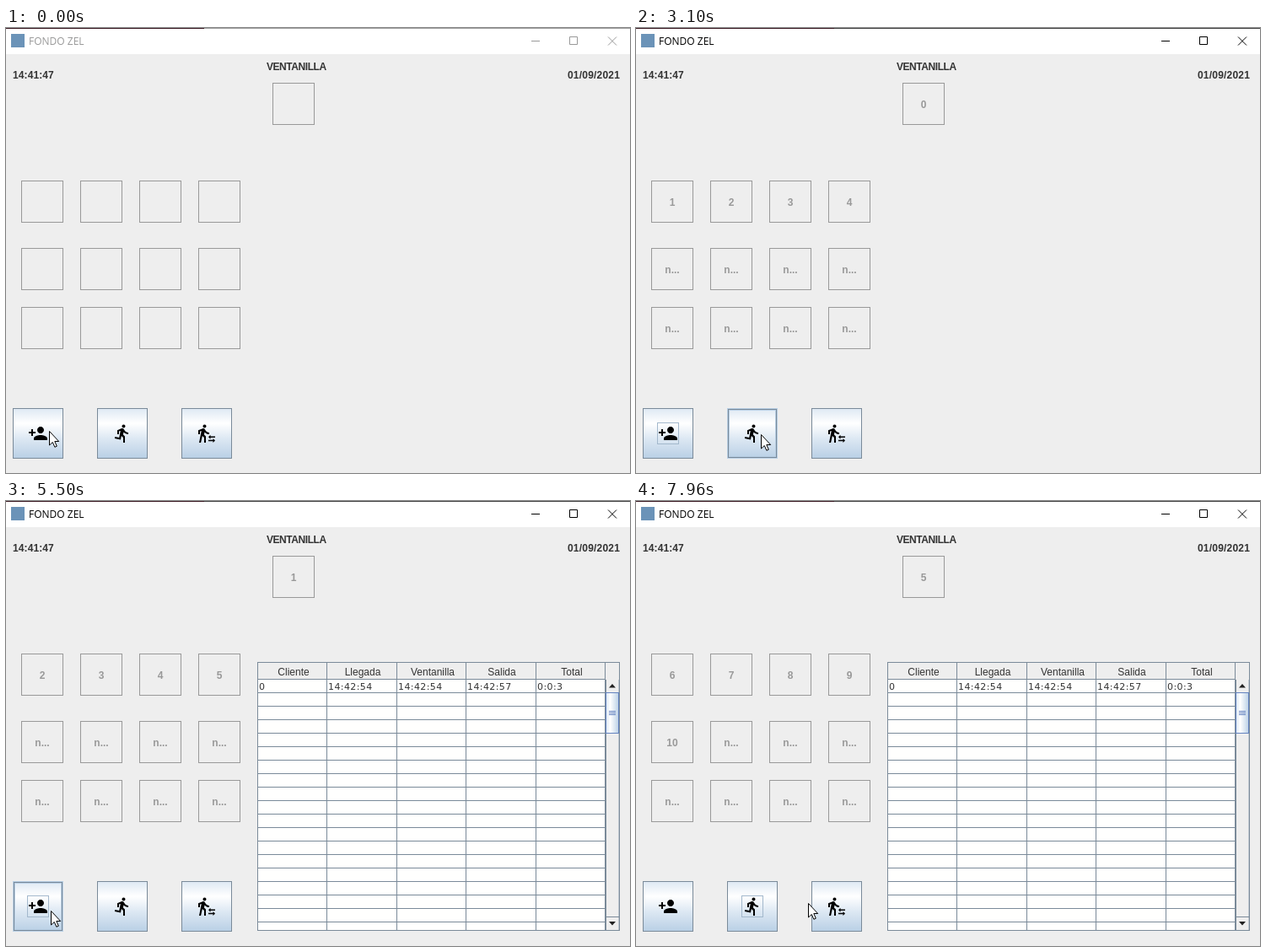
These frames come from a looping animation (740x528 px, 8 s). An HTML page:

```html
<!DOCTYPE html>
<html lang="es">
<head>
<meta charset="utf-8">
<title>Ventanilla</title>
<style>
  html, body { margin: 0; width: 100%; height: 100%; overflow: hidden; background: #eee; }
  svg { display: block; width: 740px; height: 528px; }
  text { font-family: "Liberation Sans", Arial, sans-serif; font-size: 12px; fill: #333; white-space: pre; }
  .bold { font-weight: bold; }
  .mid { text-anchor: middle; }
  .off { fill: #999; }
  .title { font-family: "Open Sans", sans-serif; }
  .row { font-family: "DejaVu Sans", sans-serif; font-size: 11px; letter-spacing: .4px; }
</style>
</head>
<body>
<svg id="stage" viewBox="0 0 740 528">
  <defs>
    <linearGradient id="ocean" x2="0" y2="1">
      <stop offset="0" stop-color="#dde8f3"/>
      <stop offset=".3" stop-color="#fff"/>
      <stop offset=".6" stop-color="#dde8f3"/>
      <stop offset="1" stop-color="#b8cfe5"/>
    </linearGradient>
    <linearGradient id="thumb">
      <stop offset="0" stop-color="#dde8f3"/>
      <stop offset=".3" stop-color="#fff"/>
      <stop offset="1" stop-color="#b8cfe5"/>
    </linearGradient>
  </defs>
</svg>
<script>
const LOOP = 8000;
const EDGE = '#7a8a99', SOFT = '#b8cfe5', FOCUS = '#a3b8cc';
const stage = document.getElementById('stage');

function add(parent, tag, attrs, text) {
  const el = document.createElementNS('http://www.w3.org/2000/svg', tag);
  for (const k in attrs) el.setAttribute(k, attrs[k]);
  if (text !== undefined) el.textContent = text;
  parent.append(el);
  return el;
}
const fill = (p, x, y, width, height, color) =>
  add(p, 'rect', { x, y, width, height, fill: color });
const frame = (p, x, y, w, h, color) =>
  add(p, 'rect', { x: x + .5, y: y + .5, width: w - 1, height: h - 1, fill: 'none', stroke: color });
const label = (p, x, y, cls, text) => add(p, 'text', { x, y, class: cls }, text);
const path = (p, d, attrs) => add(p, 'path', { d, ...attrs });
const group = p => add(p, 'g', {});
const show = (el, on) => el.setAttribute('visibility', on ? 'visible' : 'hidden');

// Window and title bar
fill(stage, 0, 0, 740, 528, '#eee');
fill(stage, 0, 0, 740, 31, '#fff');
const topLine = fill(stage, 0, 0, 740, 1, '#8c8c8c');
fill(stage, 0, 0, 235, 1, '#3a1822');
fill(stage, 6, 7, 16, 16, '#6b93b8');
const title = label(stage, 27, 20, 'title', 'FONDO ZEL');
const controls = path(stage, 'M623 15.5h10M668.5 10.5h9v9h-9zM714 10.5l10 10M724 10.5l-10 10', { fill: 'none' });

// Labels and boxes
label(stage, 8, 60, 'bold', '14:41:47').style.letterSpacing = '.1px';
label(stage, 309, 50, 'bold', 'VENTANILLA').style.letterSpacing = '-.45px';
label(stage, 666, 60, 'bold', '01/09/2021').style.letterSpacing = '.2px';

function box(x, y) {
  frame(stage, x, y, 50, 50, '#999');
  return label(stage, x + 25, y + 30, 'bold mid off', '');
}
const desk = box(316, 65);
const cells = [];
for (const y of [181, 261, 331])
  for (let i = 0; i < 4; i++) cells.push(box(18 + i * 70, y));

// Table
const table = group(stage);
const cols = [298, 380, 463, 545, 628, 710];
const heads = ['Cliente', 'Llegada', 'Ventanilla', 'Salida', 'Total'];
const values = ['0', '14:42:54', '14:42:54', '14:42:57', '0:0:3'];
fill(table, 298, 191, 430, 320, '#eee');
fill(table, 299, 212, 412, 298, '#fffffe');
fill(table, 299, 211, 412, 1, EDGE);
for (let y = 227; y < 508; y += 16) fill(table, 299, y, 412, 1, EDGE);
cols.forEach(x => fill(table, x, 192, 1, 318, EDGE));
heads.forEach((h, i) => {
  label(table, cols[i] + 43, 207, 'mid', h);
  label(table, cols[i] + 2, 224, 'row', values[i]);
});
frame(table, 298, 191, 430, 319, EDGE);
fill(table, 711, 212, 16, 297, '#eee');
fill(table, 711, 212, 1, 297, EDGE);
fill(table, 726, 212, 1, 297, '#c4ccd4');
fill(table, 712, 227, 15, 1, EDGE);
fill(table, 712, 493, 15, 1, EDGE);
path(table, 'M715 221.5h8l-4-4.5zM715 499h8l-4 4.5z', { fill: '#222' });
fill(table, 712, 228, 15, 48, 'url(#thumb)');
frame(table, 711, 227, 16, 49, '#6382bf');
for (const y of [249, 251, 253]) fill(table, 715, y, 8, 1, '#6382bf');

// Buttons
const icons = [
  'M15 12c2.21 0 4-1.79 4-4s-1.79-4-4-4-4 1.79-4 4 1.79 4 4 4zm-9-2V7H4v3H1v2h3v3h2v-3h3v-2H6zm9 4c-2.67 0-8 1.34-8 4v2h16v-2c0-2.66-5.33-4-8-4z',
  'M13.49 5.48c1.1 0 2-.9 2-2s-.9-2-2-2-2 .9-2 2 .9 2 2 2zm-3.6 13.9l1-4.4 2.1 2v6h2v-7.5l-2.1-2 .6-3c1.3 1.5 3.3 2.5 5.5 2.5v-2c-1.9 0-3.5-1-4.3-2.4l-1-1.6c-.4-.6-1-1-1.7-1-.3 0-.5.1-.8.1l-5.2 2.2v4.7h2v-3.4l1.8-.7-1.6 8.1-4.9-1-.4 2 7 1.4z',
  'M16.49 15.5v-1.75L14 16.25l2.49 2.5V17H22v-1.5zm3.02 4.25H14v1.5h5.51V23L22 20.5 19.51 18zM9.5 5.5c1.1 0 2-.9 2-2s-.9-2-2-2-2 .9-2 2 .9 2 2 2zM5.75 8.9L3 23h2.1l1.75-8L9 17v6h2v-7.55L8.95 13.4l.6-3C10.85 12 12.8 13 15 13v-2c-1.85 0-3.45-1-4.35-2.45l-.95-1.6C9.35 6.35 8.7 6 8 6c-.25 0-.5.05-.75.15L2 8.3V13h2V9.65z'
];
const buttons = icons.map((d, i) => {
  const g = add(stage, 'g', { transform: `translate(${8 + i * 100} 451)` });
  fill(g, 0, 0, 60, 60, 'url(#ocean)');
  frame(g, 0, 0, 60, 60, EDGE);
  const hover = group(g);
  frame(hover, 0, 0, 60, 60, SOFT);
  frame(hover, 2, 2, 56, 56, SOFT);
  frame(hover, 1, 1, 58, 58, EDGE);
  const down = group(g);
  fill(down, 0, 0, 60, 60, SOFT);
  frame(down, 0, 0, 60, 60, EDGE);
  fill(down, 1, 1, 58, 1, EDGE);
  fill(down, 1, 1, 1, 58, EDGE);
  const focus = frame(g, 17, 17, 26, 26, FOCUS);
  path(g, d, { transform: 'translate(18 18)' });
  return { hover, down, focus };
});

const cursor = path(stage, 'M0 0V16.5L3.8 13L6.4 18.8L8.8 17.7L6.3 12H11.2Z',
  { fill: '#fff', stroke: '#000', 'stroke-width': 1 });

// Clicks: press, release, button (0 add, 1 call next, 2 finish)
const clicks = [
  [760, 1100, 0], [1360, 1460, 0], [2060, 2100, 0], [2300, 2330, 0], [2560, 2630, 0],
  [3260, 3430, 1], [4430, 4530, 2],
  [5300, 5500, 0], [5660, 5730, 0], [5860, 5930, 0], [6060, 6130, 0], [6300, 6400, 0], [6500, 6560, 0],
  [7000, 7060, 1], [7260, 7300, 1], [7430, 7460, 1], [7560, 7630, 1]
];
// Pointer: time, x, y
const track = [
  [0, 51, 478], [2660, 51, 478], [2860, 163, 481], [3000, 163, 481], [3100, 148, 482],
  [3500, 148, 482], [3700, 204, 485], [4000, 204, 485], [4130, 227, 482], [4600, 227, 482],
  [5100, 53, 486], [6580, 53, 486], [6760, 157, 474], [7660, 157, 474], [7960, 204, 477], [LOOP, 204, 477]
];

function pointer(t) {
  const i = track.findIndex(k => k[0] > t);
  const [t0, x0, y0] = track[i - 1], [t1, x1, y1] = track[i];
  const k = (t - t0) / (t1 - t0);
  return [Math.round(x0 + (x1 - x0) * k), Math.round(y0 + (y1 - y0) * k)];
}

function render(t) {
  let last = -1, served = 0, held = -1, focused = -1, done = false;
  for (const [press, release, b] of clicks) {
    if (t < press) break;
    focused = b;
    if (t < release) { held = b; break; }
    if (b === 0) last++;
    if (b === 1) served++;
    if (b === 2) done = true;
  }
  const active = t >= 760, ink = active ? '#000' : '#999';
  title.style.fill = ink;
  controls.setAttribute('stroke', ink);
  topLine.setAttribute('fill', active ? '#444' : '#a0a0a0');

  desk.textContent = last < 0 ? '' : served;
  cells.forEach((c, i) => {
    const n = served + 1 + i;
    c.textContent = last < 0 ? '' : n <= last ? n : 'n...';
  });
  show(table, done);

  const [x, y] = pointer(t);
  cursor.setAttribute('transform', `translate(${x + .5} ${y + .5})`);
  buttons.forEach((b, i) => {
    const left = 8 + i * 100;
    show(b.hover, t >= 30 && x >= left && x < left + 60);
    show(b.down, held === i);
    show(b.focus, focused === i);
  });
}

const start = performance.now();
function tick() {
  render((performance.now() - start) % LOOP);
  requestAnimationFrame(tick);
}
tick();
</script>
</body>
</html>
```
